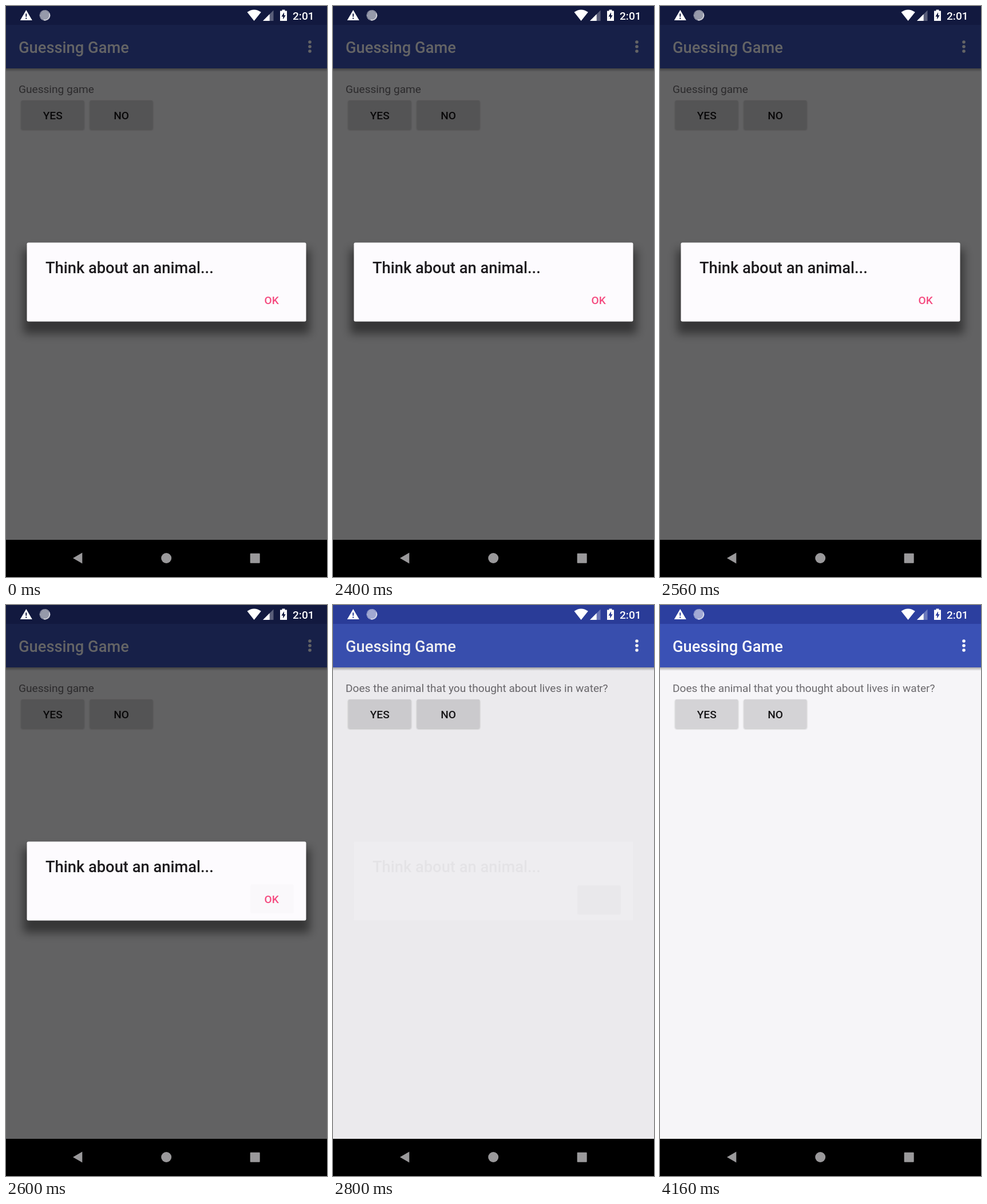
An HTML page that plays this animation: 561x998 px, repeating every 5000 ms.

```html
<!DOCTYPE html>
<html lang="en">
<head>
<meta charset="utf-8">
<title>Guessing Game</title>
<style>
  html, body { margin: 0; width: 100%; height: 100%; overflow: hidden; background: #000; }
  svg { display: block; width: 561px; height: 998px; }
  text { font-family: Roboto, sans-serif; font-size: 19.1px; font-weight: 500; }
  .title { font-size: 27.3px; }
  .body { font-weight: 400; fill: #6c6a6e; }
  .button rect { fill: #d4d3d6; }
  .button text { fill: #161517; text-anchor: middle; }
  #answer { opacity: 0; }
</style>
</head>
<body>
<svg viewBox="0 0 561 998">
  <defs>
    <filter id="soft" x="-20%" y="-40%" width="140%" height="180%">
      <feGaussianBlur stdDeviation="8"/>
    </filter>
    <filter id="lift" x="-10%" y="-10%" width="120%" height="130%">
      <feDropShadow dx="0" dy="1" stdDeviation="1.2" flood-opacity=".3"/>
    </filter>
    <linearGradient id="barShadow" x2="0" y2="1">
      <stop stop-color="#000" stop-opacity=".32"/>
      <stop offset="1" stop-color="#000" stop-opacity="0"/>
    </linearGradient>
  </defs>

  <!-- App screen -->
  <rect width="561" height="933" fill="#f6f5f8"/>
  <rect y="109" width="561" height="6" fill="url(#barShadow)"/>
  <rect y="32" width="561" height="77" fill="#3a51b5"/>
  <rect width="561" height="33" fill="#2c3f9f"/>
  <text class="title" x="22" y="81.5" fill="#fafafd">Guessing Game</text>
  <g fill="#fafafd">
    <circle cx="531" cy="63" r="2.8"/>
    <circle cx="531" cy="71" r="2.8"/>
    <circle cx="531" cy="79" r="2.8"/>
  </g>
  <text id="prompt" class="body" x="22" y="152">Guessing game</text>
  <text id="answer" class="body" x="22" y="152">Does the animal that you thought about lives in water?</text>
  <g class="button">
    <rect x="26.5" y="165" width="110" height="50.5" rx="2.5" filter="url(#lift)"/>
    <text x="81.7" y="197.5">YES</text>
    <rect x="146.5" y="165" width="110" height="50.5" rx="2.5" filter="url(#lift)"/>
    <text x="201.5" y="197.5">NO</text>
  </g>

  <rect id="scrim" width="561" height="933" opacity=".6"/>

  <!-- Dialog -->
  <rect id="shadow" x="30" y="425" width="501" height="148" rx="4" opacity=".45" filter="url(#soft)"/>
  <rect id="card" x="36.5" y="413.5" width="488" height="138" rx="2.7" fill="#fdfbfe"/>
  <rect id="press" x="427" y="488" width="76" height="51" rx="2.5" opacity="0"/>
  <text id="heading" class="title" x="69" y="466.5" fill="#1d1b1e">Think about an animal...</text>
  <text id="ok" x="451.5" y="520.5" fill="#f54b80">OK</text>

  <!-- Status bar -->
  <g fill="#fff" fill-rule="evenodd">
    <path d="M35.3 7 45.8 25H24.8ZM34.3 13.2V18.8H36.3V13.2ZM34.3 20.6V22.7H36.3V20.6Z"/>
    <circle cx="68" cy="16.3" r="8" fill-opacity=".56"/>
    <circle cx="68" cy="16.3" r="8.6" fill="none" stroke="#fff" stroke-opacity=".75" stroke-width="1.6" stroke-dasharray="1.5 .8"/>
    <path d="M75.5 13A8.2 8.2 0 0 1 66 24.3" fill="none" stroke="#fff" stroke-opacity=".7" stroke-width="1.4"/>
    <path d="M421.5 10.8Q433.6 2.2 445.8 10.8L433.6 26Z"/>
    <path d="M449 26 467.5 7.5V26Z" fill-opacity=".3"/>
    <path d="M449 26 460.7 14.3V26Z"/>
    <path d="M482.5 8.5V6.5H487.5V8.5H491V26H479V8.5ZM486 11 481.4 18.4H484.2V23.6L488.7 16.2H486Z"/>
    <text x="501" y="24">2:01</text>
  </g>

  <!-- Navigation bar -->
  <rect y="933" width="561" height="65"/>
  <g fill="#9a999b">
    <path d="M117 965 133.3 955.5V974.5Z"/>
    <circle cx="280.2" cy="965" r="9"/>
    <rect x="426.7" y="956.7" width="17" height="17" rx="1"/>
  </g>
</svg>
<script>
  const LOOP = 5000;
  const opacity = value => ({ opacity: value });

  // Each track lists [time in ms, style]; a style holds until the next step.
  const tracks = {
    prompt: [[0, opacity(1)], [2700, opacity(0)]],
    answer: [[0, opacity(0)], [2700, opacity(1)]],
    scrim: [[0, opacity(.6)], [2800, opacity(.045)], [2900, opacity(0)]],
    shadow: [[0, opacity(.45)], [2800, opacity(0)]],
    card: [[0, opacity(1)], [2800, opacity(.2)], [2900, opacity(0)]],
    heading: [[0, opacity(1)], [2800, opacity(.045)], [2900, opacity(0)]],
    ok: [[0, opacity(1)], [2800, opacity(0)]],
    press: [
      [0, { opacity: 0, transform: 'none' }],
      [2600, { opacity: .01, transform: 'none' }],
      [2800, { opacity: .016, transform: 'translate(0px, 2px)' }],
      [2900, { opacity: 0, transform: 'none' }]
    ]
  };

  for (const [id, steps] of Object.entries(tracks)) {
    const frames = steps.map(([time, style]) => ({ ...style, offset: time / LOOP, easing: 'step-end' }));
    frames.push({ ...steps.at(-1)[1], offset: 1 });
    document.getElementById(id).animate(frames, { duration: LOOP, iterations: Infinity });
  }
</script>
</body>
</html>
```
